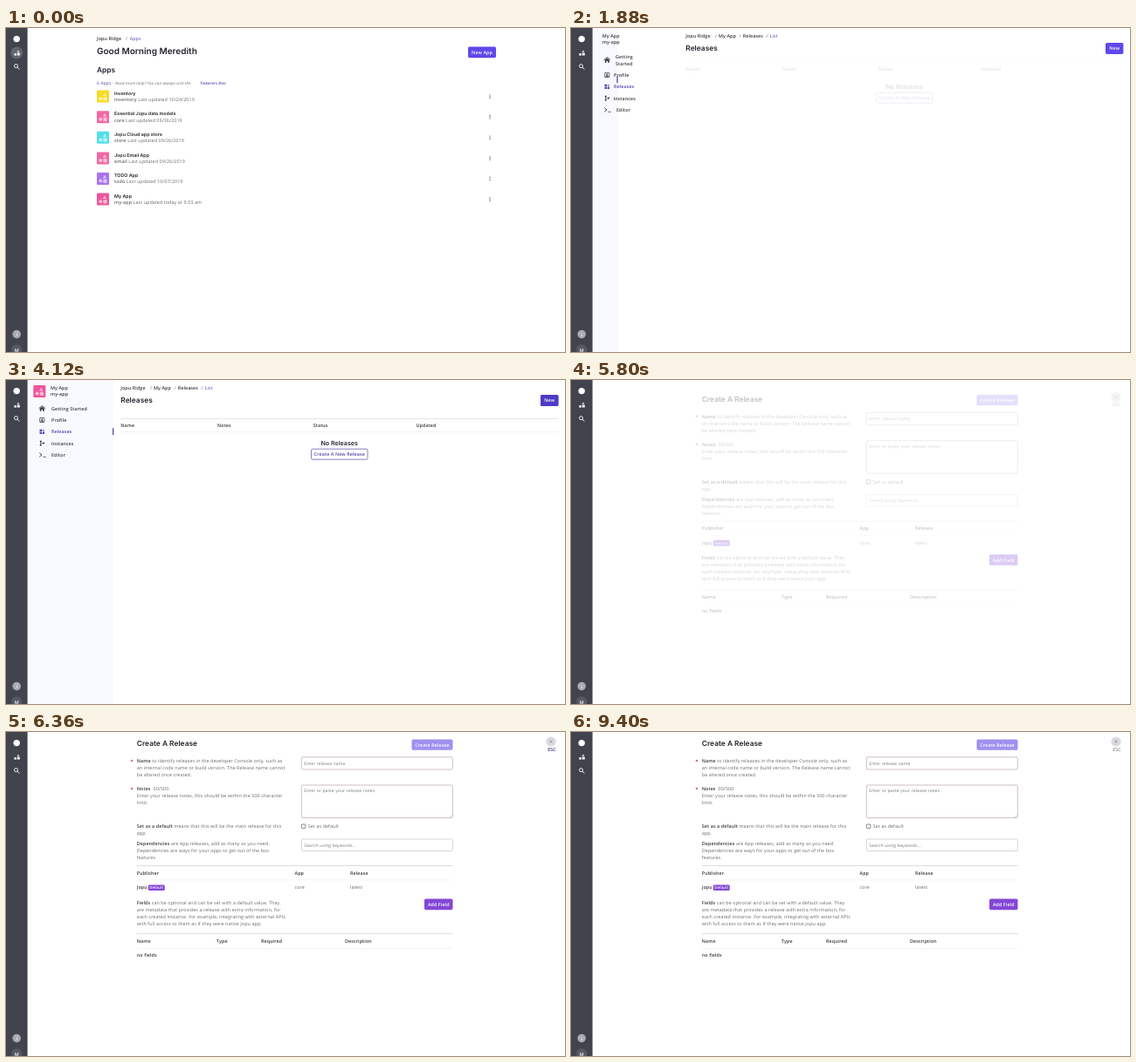
Recreate the animation shown at these times as an HTML page. Size 640 by 372 pixels, loop 9.72 s.

```html
<!DOCTYPE html>
<html lang="en">
<head>
<meta charset="utf-8">
<title>App console</title>
<style>
html, body { margin: 0; width: 100%; height: 100%; overflow: hidden; background: #fff; }
svg { display: block; width: 640px; height: 372px; }
text { font: 5.33px "Open Sans", "Noto Sans", sans-serif; letter-spacing: .11px; fill: #68686e; text-rendering: geometricPrecision; white-space: pre; }
.b { font-weight: 600; fill: #38383f; }
.h { font: 600 8.4px Inter, sans-serif; letter-spacing: 0; fill: #24242e; }
.big { font-size: 10px; }
.mid { font-size: 7.1px; }
.item { font-size: 5.33px; }
.hint { font-size: 5px; fill: #777; }
.note { font-size: 4.57px; font-style: italic; }
.p { fill: #5643b0; }
.w { font-weight: 600; fill: #fff; }
.c { text-anchor: middle; }
</style>
</head>
<body>
<svg id="stage" viewBox="0 0 640 372"></svg>
<script>
// *word* marks bold text
const text = (x, y, str, cls = '') =>
  `<text x="${x}" y="${y}" class="${cls}">${str.replace(/\*(.+?)\*/g, '<tspan class="b">$1</tspan>')}</text>`;
const lines = (x, y, ...rows) => rows.map((row, i) => text(x, y + i * 8, row)).join('');
const box = (x, y, w, h, fill, r = 0, more = '') =>
  `<rect x="${x}" y="${y}" width="${w}" height="${h}" rx="${r}" fill="${fill}" ${more}/>`;
const outline = (x, y, w, h, color, r = 1.5) => box(x, y, w, h, '#fff', r, `stroke="${color}" stroke-width=".7"`);
const dot = (x, y, r, fill, more = '') => `<circle cx="${x}" cy="${y}" r="${r}" fill="${fill}" ${more}/>`;
const path = (d, color, w = .8, fill = 'none') => `<path d="${d}" stroke="${color}" stroke-width="${w}" fill="${fill}"/>`;
const rule = (x, y, w, color = '#dcdce0') => box(x, y, w, .7, color);
const group = (id, body) => `<g id="${id}">${body}</g>`;
const button = (x, y, w, h, label, fill) =>
  box(x, y, w, h, fill, 1.7) + text(x + w / 2, y + h / 2 + 2, label, 'w c');

const appIcon = (x, y, color) => box(x, y, 14, 14, color, 1) +
  `<g fill="#fff" opacity=".6"><path d="M9 2.8l2.2 3.6H6.8z"/><circle cx="4.3" cy="9.6" r="2"/><rect x="7.4" y="7.7" width="4.2" height="4.2"/></g>`
    .replace('<g', `<g transform="translate(${x} ${y})"`);

function rail() {
  return box(0, 0, 24.6, 372, '#41434d') +
    dot(12.2, 12.6, 3.7, '#fff') +
    dot(12.3, 28.5, 7, '#62646e', 'id="railHover"') +
    box(9.3, 29, 2.7, 2.7, '#e4e4ea', .6) + box(12.8, 28.6, 3, 3, '#fff', .3) +
    path('M13.9 25.5l1.5 2.3h-3z', 'none', 0, '#e4e4ea') +
    dot(11.5, 43.6, 2, 'none', 'stroke="#fff" stroke-width=".9"') + path('M13 45.1l2.3 2.4', '#fff', 1) +
    dot(12.2, 351.6, 4.8, '#a9aab2') + text(12.25, 353.6, 'i', 'w c') +
    dot(12.2, 369.5, 6.2, '#565862') + text(12.2, 372.2, 'M', 'w c');
}

function appsPage() {
  const apps = [
    ['Inventory', 'inventory', '10/24/2019', '#f8da26'],
    ['Essential Jopu data models', 'core', '09/26/2019', '#f268a2'],
    ['Jopu Cloud app store', 'store', '09/26/2019', '#55dfe9'],
    ['Jopu Email App', 'email', '09/26/2019', '#f268a2'],
    ['TODO App', 'todo', '10/07/2019', '#a873f2'],
    ['My App', 'my-app', 'today at 9:33 am', '#ef559b'],
  ];
  return text(104, 13.7, 'Jopu Ridge', 'b') + text(137, 13.7, '/') + text(141.7, 13.7, 'Apps', 'p') +
    text(104, 29.9, 'Good Morning Meredith', 'h big') + text(104, 50.6, 'Apps', 'h') +
    button(529, 21.5, 32, 12.7, 'New App', '#5e48ea') +
    text(104, 65.3, '6 Apps', 'hint p') + text(121.5, 65.3, '-', 'note') +
    text(125, 65.3, 'Need more help? You can always visit the', 'note') +
    text(222, 65.3, 'Tinkerers Den', 'note b p') +
    apps.map(([name, id, date, color], i) => {
      const y = 71.6 + i * 23.6;
      return appIcon(104, y, color) + text(124, y + 5.1, name, 'h item') +
        `<text x="124" y="${y + 12.4}"><tspan font-weight="600">${id}</tspan> Last updated ${date}</text>` +
        [-1.8, 0, 1.8].map(d => dot(554, y + 7 + d, .6, '#444')).join('');
    }).join('');
}

// Menu icons, each centred on 0,0
const ink = '#33333b', purple = '#5643b0';
const menuIcons = [
  path('M-3.7 0L0-3 3.7 0', ink, .9) + path('M-2.5 0L0-2 2.5 0v3h-1.7v-2h-1.6v2h-1.7z', 'none', 0, ink),
  box(-2.6, -2.5, 5.2, 5, 'none', .3, `stroke="${ink}" stroke-width=".7"`) + dot(0, -.7, .9, ink) + path('M-1.8 1.8a1.8 1.5 0 013.6 0z', 'none', 0, ink),
  box(-2.8, -2.6, 2.5, 2.3, purple) + box(.3, -2.6, 2.5, 2.3, '#a99add') + box(-2.8, .3, 2.5, 2.3, purple) + box(.3, .3, 2.5, 2.3, purple),
  path('M-1.6-2v4M-1.6 0h3', ink, .6) + dot(-1.6, -2.2, 1, ink) + dot(-1.6, 2.2, 1, ink) + dot(1.8, 0, 1, ink),
  path('M-3-2.3L-.4 0-3 2.3', ink, 1) + path('M1 2.4h3.6', ink, .7),
];

function menu(narrow) {
  const items = [['Getting Started', 51], ['Profile', 49], ['Releases', 49], ['Instances', 48.4], ['Editor', 52]];
  const nameX = narrow ? 35.7 : 51;
  return (narrow ? '' : appIcon(31.3, 6, '#ef559b')) +
    text(nameX, 10.5, 'My App', 'b') + text(nameX, 17.6, 'my-app', 'b') +
    items.map(([label, tight], i) => {
      const y = 32.7 + i * 13.3, x = narrow ? tight : 52, drop = narrow ? (i ? 8 : 4) : 0;
      const cls = i == 2 ? 'b p' : 'b';
      const caption = narrow && !i
        ? text(x, y + 2, 'Getting', cls) + text(x, y + 10, 'Started', cls)
        : text(x, y + drop + 2, label, cls);
      return `<g transform="translate(41.3 ${y + drop})">${menuIcons[i]}</g>` + caption;
    }).join('');
}

function releasesPage() {
  const crumbs = [['Jopu Ridge', 131.3], ['My App', 169], ['Releases', 196.7]];
  return box(24.6, 0, 98.6, 372, '#f8f9fe', 0, 'id="panel"') +
    group('menuTight', menu(true)) + group('menuWide', menu(false)) +
    box(0, 55.3, 1.3, 7.8, purple, 0, 'id="marker"') +
    crumbs.map(([label, x], i) => text(x, 11.4, label, 'b') + text([165, 192.5, 223.4][i], 11.4, '/')).join('') +
    text(227.7, 11.4, 'List', 'p') + text(131.3, 26.4, 'Releases', 'h') +
    box(612, 17, 20.4, 13, '#5e48ea', 1.7) + box(612, 17, 20.4, 13, '#4b3bc6', 1.7, 'id="newHover"') +
    text(622.2, 25.4, 'New', 'w c') +
    group('table', rule(131, 44.2, 501.5) + rule(131, 59, 501.5, '#ececf0') +
      [['Name', 131.3], ['Notes', 242], ['Status', 351.7], ['Updated', 469.5]].map(([s, x]) => text(x, 53.8, s, 'b')).join('') +
      text(381.7, 74.7, 'No Releases', 'h mid c') +
      outline(349.5, 79.2, 64.5, 12, '#5a4a9c') + text(381.8, 87.2, 'Create A New Release', 'b p c'));
}

function createPage() {
  const row = (y, cls, cells) => cells.map(([s, x]) => text(x, y, s, cls)).join('');
  return text(149.8, 16, 'Create A Release', 'h') +
    button(464.5, 8.4, 47, 12.3, 'Create Release', '#a190f1') +
    [33, 65].map(y => dot(144, y, 1.3, '#d87592')).join('') +
    lines(149.8, 35, '*Name* to identify releases in the developer Console only, such as',
      'an internal code name or build version. The Release name cannot', 'be altered once created.') +
    lines(149.8, 67, '*Notes*  00/500', 'Enter your release notes, this should be within the 500 character', 'limit.') +
    lines(149.8, 110.3, '*Set as a default* means that this will be the main release for this', 'app.') +
    lines(149.8, 130.3, '*Dependencies* are App releases, add as many as you need.',
      'Dependencies are ways for your apps to get out of the box', 'features.') +
    outline(338.3, 28.8, 173, 14.2, '#b9a3aa') + text(341.3, 37.8, 'Enter release name', 'hint') +
    outline(338.3, 61, 173, 37.6, '#b9a3aa') + text(341.3, 69.2, 'Enter or paste your release notes', 'hint') +
    path('M508.4 97.6l2-2M509.6 97.6l.8-.8', '#888', .4) +
    outline(338.4, 106, 4.4, 4.4, '#55555c', .5) + text(345.8, 110.2, 'Set as default') +
    outline(338.3, 123, 173, 13.6, '#c4c4c9') + text(341.3, 131.6, 'Search using keywords...', 'hint') +
    rule(149.5, 153.2, 362, '#cfcfd4') + rule(149.5, 169.6, 362, '#f0f0f3') +
    row(163.8, 'b', [['Publisher', 149.8], ['App', 330.5], ['Release', 394]]) +
    row(180.4, '', [['*jopu*', 149.8], ['core', 330.5], ['latest', 394]]) +
    box(162.8, 175.4, 19, 6.5, '#8447d6', 1.5) +
    `<text x="172.3" y="180.2" class="w c" style="font-size:4.3px">Default</text>` +
    lines(149.8, 197.5, '*Fields* can be optional and can be set with a default value. They',
      'are metadata that provides a release with extra information, for',
      'each created instance. For example, integrating with external APIs',
      'with full access to them as if they were native Jopu app.') +
    button(479, 191.6, 32.5, 12.6, 'Add Field', '#8447d6') +
    rule(149.5, 231.4, 362, '#cfcfd4') + rule(149.5, 248, 362, '#f0f0f3') +
    row(241.9, 'b', [['Name', 149.8], ['Type', 241], ['Required', 292], ['Description', 388]]) +
    text(149.8, 258.2, 'no fields', 'b') +
    dot(624, 11, 5.6, '#dadade') + path('M622.5 9.5l3 3M625.5 9.5l-3 3', '#77777d', .6) +
    text(625, 21.8, 'ESC', 'c') + group('escHover', text(625, 21.8, 'ESC', 'p c'));
}

document.getElementById('stage').innerHTML =
  group('apps', appsPage()) + group('releases', releasesPage()) + group('create', createPage()) + rail();

const el = id => document.getElementById(id);
const set = (id, name, value) => el(id).setAttribute(name, value);
const show = (id, on) => set(id, 'visibility', on ? 'visible' : 'hidden');
const ease = (t, from, to) => {
  const k = Math.min(1, Math.max(0, (t - from) / (to - from)));
  return k * k * (3 - 2 * k);
};
const LOOP = 9720, OPEN_APP = 1760, OPEN_FORM = 5748;

function draw(t) {
  set('railHover', 'opacity', 1 - ease(t, 40, 360));
  set('apps', 'display', t < OPEN_APP ? 'inline' : 'none');
  set('releases', 'display', t >= OPEN_APP && t < OPEN_FORM ? 'inline' : 'none');
  set('create', 'display', t >= OPEN_FORM ? 'inline' : 'none');

  const width = 98.6 * ease(t, 1820, 1990), tight = width < 72;
  set('panel', 'width', width);
  set('marker', 'x', 23.4 + width);
  show('menuTight', tight);
  show('menuWide', !tight);

  const table = ease(t, 1836, 2036);
  set('table', 'opacity', table);
  set('table', 'transform', `translate(0 ${-5.7 * (1 - table)})`);
  set('newHover', 'opacity', ease(t, 3640, 3840));

  const form = ease(t, OPEN_FORM, 5900);
  set('create', 'opacity', form);
  set('create', 'transform', `translate(0 ${12 * (1 - form)})`);
  set('escHover', 'opacity', ease(t, 5920, 6200) - ease(t, 7800, 8120));
}

const start = performance.now();
(function tick() {
  draw((performance.now() - start) % LOOP);
  requestAnimationFrame(tick);
})();
</script>
</body>
</html>
```
